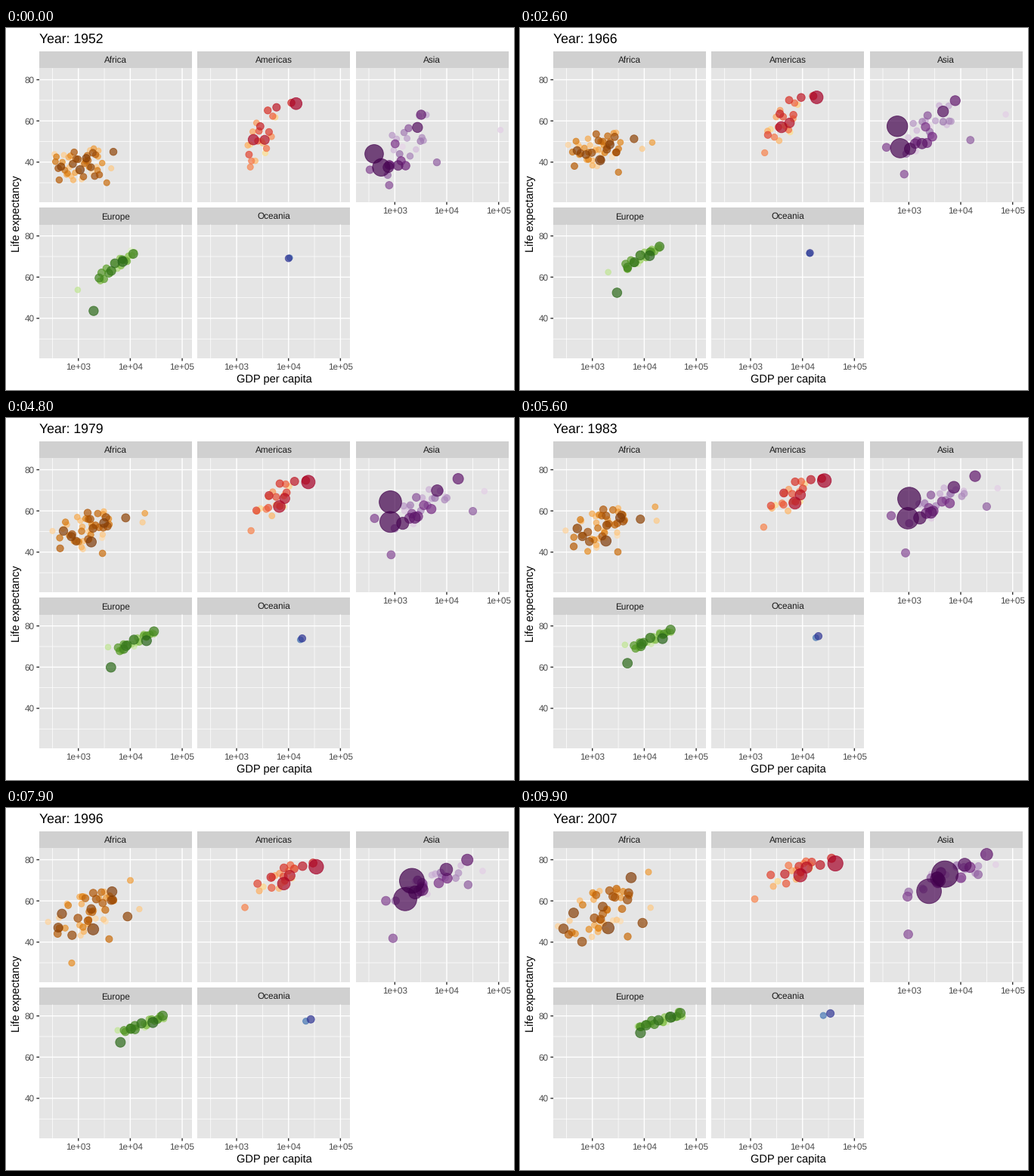
A matplotlib script that plays this animation: 672x480 px, repeating every 10 s.

```python
import numpy as np
import matplotlib.pyplot as plt
from matplotlib.animation import FuncAnimation
from matplotlib.colors import LinearSegmentedColormap
from matplotlib.patches import Rectangle

plt.rcParams.update({"font.family": "Liberation Sans", "text.hinting": "no_hinting"})

W, H, DPI = 672, 480, 96
FRAMES, INTERVAL = 100, 100
T = np.linspace(0, 1, FRAMES)
YEARS = 1952 + 55 * T

LEFT, TOP, PANEL_W, PANEL_H = 44.07, 30.9, 201.98, 177.3
STRIP_H, GAP, TICK = 22.5, 7.33, 3.67
X_MIN, X_MAX = 2.248, 5.189      # log10 of GDP
Y_MIN, Y_MAX = 20.65, 85.55

rng = np.random.default_rng(12)
fig = plt.figure(figsize=(W / DPI, H / DPI), dpi=DPI, facecolor="white")
ax = fig.add_axes([0, 0, 1, 1])
ax.set(xlim=(0, W), ylim=(H, 0))
ax.axis("off")


def box(x, y, w, h, color):
    ax.add_patch(Rectangle((x, y), w, h, fc=color, lw=0, zorder=1))


def line(xs, ys, color, px):
    ax.plot(xs, ys, color=color, lw=px * 72 / DPI, zorder=2,
            solid_capstyle="butt", snap=False)


def label(x, y, s, size=8.8, color="#4D4D4D", ha="center", **kw):
    return ax.text(x, y, s, size=size, color=color, ha=ha, va="baseline", **kw)


def px_x(left, v):
    return left + (v - X_MIN) / (X_MAX - X_MIN) * PANEL_W


def px_y(top, v):
    return top + (Y_MAX - v) / (Y_MAX - Y_MIN) * PANEL_H


def draw_panel(name, col, row, x_axis):
    """Draw strip, grid and axes; return the plot area's left and top."""
    left = LEFT + col * (PANEL_W + GAP)
    strip = TOP + row * (STRIP_H + PANEL_H + GAP)
    top = strip + STRIP_H
    right, bottom = left + PANEL_W, top + PANEL_H
    box(left, strip, PANEL_W, STRIP_H, "#D0D0D0")
    box(left, top, PANEL_W, PANEL_H, "#E5E5E5")
    label((left + right) / 2, strip + 15.1, name, color="#1A1A1A")
    for v in (2.5, 3.5, 4.5, 3, 4, 5):
        x = px_x(left, v)
        line((x, x), (top, bottom), "white", .71 if v % 1 else 1.42)
        if x_axis and v % 1 == 0:
            line((x, x), (bottom, bottom + TICK), "#333333", 1.42)
            label(x, bottom + 15.1, f"1e+{v:02d}")
    for v in (30, 50, 70, 40, 60, 80):
        y = px_y(top, v)
        major = v % 20 == 0
        line((left, right), (y, y), "white", 1.42 if major else .71)
        if col == 0 and major:
            line((left - TICK, left), (y, y), "#333333", 1.42)
            label(left - 6.6, y + 4.2, str(v), ha="right")
    return left, top


def spread(n):
    """Shuffled, evenly spaced values with unit deviation."""
    return rng.permutation(np.linspace(-1.7, 1.7, n))


def drift(n, start, growth, end, bend):
    """Seeded points that drift from one trend line to another on a bent path.

    start: mean x, x spread, mean y, slope, y spread; growth: mean, spread;
    end: mean y, slope, y spread; bend: midway offset in x and y.
    """
    mx, sx, my, slope, sy = start
    x0 = mx + sx * spread(n)
    y0 = my + slope * (x0 - mx) + sy * spread(n)
    x1 = x0 + growth[0] + growth[1] * spread(n)
    y1 = end[0] + end[1] * (x1 - mx - growth[0]) + end[2] * spread(n)
    arc = 4 * T * (1 - T)
    return (x0[:, None] + np.outer(x1 - x0, T) + bend[0] * arc,
            y0[:, None] + np.outer(y1 - y0, T) + bend[1] * arc)


def follow(points):
    """Path through key points (GDP, life expectancy) evenly spaced in time."""
    gdp, life = zip(*points)
    keys = np.linspace(0, 1, len(points))
    return np.interp(T, keys, np.log10(gdp)), np.interp(T, keys, life)


def font_size(pop):
    """Point size in pt for a population in millions, scaled by area."""
    return (2 + 10 * np.sqrt(pop / 1319)) * 2.845 + .945


class Cloud:
    """All points of one panel, ranked from the largest population down."""

    def __init__(self, panel, ramp, head, tail, births, leads, trend=None):
        left, top = draw_panel(*panel)
        pop = np.append(head, np.geomspace(*tail)) if tail else np.array(head)
        n = len(pop)
        x, y = drift(n, *trend) if trend else np.zeros((2, n, FRAMES))
        for rank, points in leads.items():
            x[rank], y[rank] = follow(points)
        colors = LinearSegmentedColormap.from_list("ramp", ramp)(np.linspace(0, 1, n))
        colors[:, 3] = .7

        # Small points first, so the large ones stay on top.
        self.x, self.y = px_x(left, x)[::-1], px_y(top, y)[::-1]
        self.size0, self.size1 = font_size(pop * births)[::-1], font_size(pop)[::-1]
        self.dots = ax.scatter(self.x[:, 0], self.y[:, 0], c=colors[::-1],
                               edgecolors=colors[::-1], linewidths=.71, zorder=3)

    def show(self, i):
        size = self.size0 + (self.size1 - self.size0) * T[i]
        self.dots.set_offsets(np.column_stack((self.x[:, i], self.y[:, i])))
        self.dots.set_sizes((.75 * size) ** 2)


clouds = [
    Cloud(("Africa", 0, 0, False),
          ["#7F3B08", "#B35806", "#E08214", "#FDB863", "#FEE0B6"],
          [135, 80], (65, .5, 50), .26,
          {0: [(1077, 36.3), (1800, 45.2), (2014, 46.9)],
           1: [(1419, 41.9), (3200, 54.5), (5581, 71.3)],
           3: [(781, 39.1), (730, 47.8), (278, 46.5)],
           4: [(4725, 45), (8300, 57), (9270, 49.3)],
           19: [(3521, 30), (2900, 39.7), (4797, 42.7)],
           28: [(493, 40), (550, 43.5), (850, 45.5), (720, 26), (863, 46.2)],
           32: [(2388, 42.7), (14000, 49), (19500, 59.5), (9600, 69), (12057, 74)],
           44: [(4293, 37), (18000, 55), (13206, 56.7)]},
          ((3.0, .27, 38.7, 4, 4.3), (.17, .22), (54.5, 10, 6.5), (.06, 4.5))),
    Cloud(("Americas", 1, 0, False),
          ["#A50026", "#D73027", "#F46D43", "#FDAE61", "#FEE090"],
          [301, 190, 109], (44, 1.5, 22), .45,
          {0: [(13990, 68.4), (24500, 74.2), (42952, 78.2)],
           1: [(2109, 50.9), (6900, 62.5), (9066, 72.4)],
           2: [(3478, 50.8), (8700, 66.5), (11978, 76.2)],
           5: [(11367, 68.8), (22000, 75), (36319, 80.7)],
           14: [(1840, 37.6), (1900, 50.8), (1202, 60.9)]},
          ((3.48, .17, 52, 24, 6), (.37, .13), (74, 7, 2.6), (.07, 2.5))),
    Cloud(("Asia", 2, 0, True),
          ["#40004B", "#762A83", "#9970AB", "#C2A5CF", "#E7D4E8"],
          [1319, 1110], (223, 1.5, 31), .4,
          {0: [(400, 44), (590, 57), (840, 64.8), (1750, 69), (4959, 73)],
           1: [(547, 37.4), (830, 55.2), (2452, 64.7)],
           2: [(750, 37.5), (1450, 54.5), (3541, 70.7)],
           5: [(3217, 63), (17500, 76), (31656, 82.6)],
           11: [(331, 36.3), (410, 57), (944, 62.1)],
           12: [(779, 28.8), (850, 39), (975, 43.8)],
           14: [(6460, 39.9), (33500, 60.5), (21655, 72.8)],
           31: [(108382, 55.6), (52000, 70), (47307, 77.6)]},
          ((3.15, .27, 47.5, 17, 6), (.58, .28), (72, 9, 2.5), (.07, 3))),
    Cloud(("Europe", 0, 1, True),
          ["#276419", "#4D9221", "#7FBC41", "#B8E186", "#E6F5D0"],
          [82, 71, 61, 61, 58], (40, .6, 25), .75,
          {0: [(7144, 67.5), (21200, 73), (32170, 79.4)],
           1: [(1969, 43.6), (4350, 60.4), (8458, 71.8)],
           23: [(974, 53.8), (3900, 70.2), (7446, 74.9)]},
          ((3.74, .2, 65.8, 17, 1.5), (.59, .12), (77.8, 8, 1), (.09, 1.2))),
    Cloud(("Oceania", 1, 1, True),
          ["#313695", "#4575B4"], [20.4, 4.1], None, .44,
          {0: [(10040, 69.1), (18700, 74.1), (34435, 81.2)],
           1: [(10557, 69.4), (17200, 73.4), (25185, 80.2)]}),
]

label(354.4, 469.8, "GDP per capita", 11, "black")
label(18.3, 246.5, "Life expectancy", 11, "black",
      rotation=90, rotation_mode="anchor")
title = label(LEFT, 20.2, "", 13.2, "black", ha="left")


def update(i):
    title.set_text(f"Year: {round(YEARS[i])}")
    for cloud in clouds:
        cloud.show(i)
    return [title] + [c.dots for c in clouds]


anim = FuncAnimation(fig, update, frames=FRAMES, interval=INTERVAL,
                     repeat=True, repeat_delay=0, blit=False)
plt.show()
```
